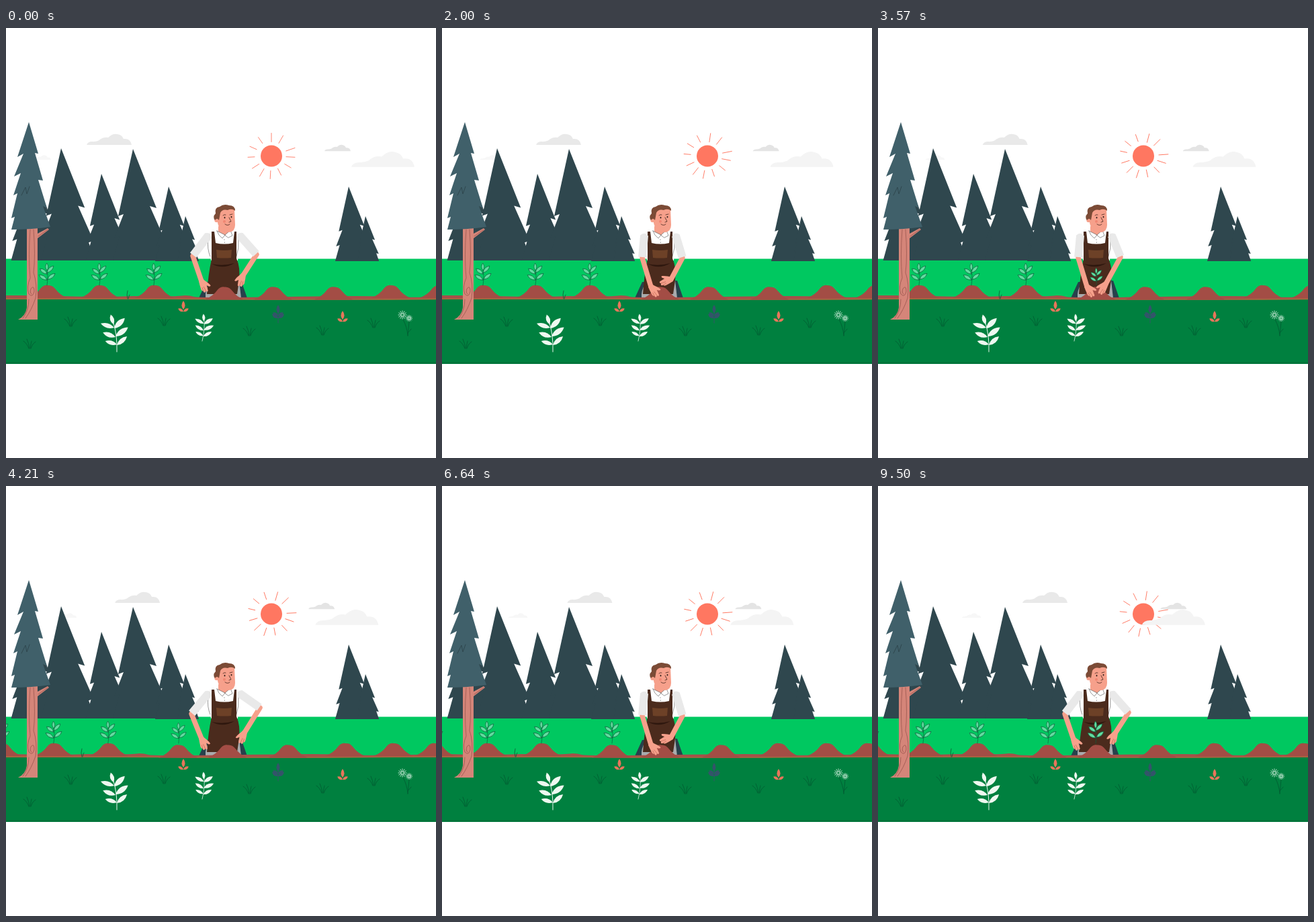
Animation, 640 px wide and 640 px high, one loop 9.57 s. Source, as an HTML page:

```html
<!DOCTYPE html>
<html lang="en">
<head>
<meta charset="utf-8">
<title>Planting</title>
<style>
html, body { margin: 0; width: 100%; height: 100%; overflow: hidden; background: #fff; }
svg { display: block; width: 100%; height: 100%; }
</style>
</head>
<body>
<svg id="stage" viewBox="0 0 640 640" fill="none" stroke-linecap="round" stroke-linejoin="round"></svg>
<script>
const LOOP = 9570, CYCLE = 4900, SLOT = 72;
const SKIN = '#f6a08b', NAVY = '#2f474e', SUN = '#ff7761';
const stage = document.getElementById('stage');
const $ = id => document.getElementById(id);
const rad = a => a * Math.PI / 180;

const place = (x, y, body, extra = '') =>
  `<g transform="translate(${x} ${y}) ${extra}">${body}</g>`;

const leaf = (x, y, angle, len, w) =>
  `<path transform="translate(${x} ${y}) rotate(${angle})" d="M0 0Q${len * .5} ${-w} ${len} 0Q${len * .5} ${w} 0 0Z"/>`;

const tree = (x, top, size) => {
  const s = size / 166;
  return `<path transform="translate(${x} ${top}) scale(${s})" d="M0 0L35 88 25 85 49 139 40 137 50 166H-30L-20 130-28 133-14 97-22 100Z"/>`;
};

const cloud = (id, y, width, fill) =>
  `<path id="${id}" data-y="${y}" data-s="${width / 100}" fill="${fill}" d="M0 25Q3 17 15 18Q27 17 30 13Q38 7 48 9Q59-2 70 2Q78 3 82 12Q97 10 100 25Z"/>`;

const tuft = (x, y) => place(x, y,
  '<path d="M-1 0Q-4-8-9-11M0 0Q-1-8-4-14M1 0Q2-7 3-11M2 0Q4-7 9-10"/>');

const mound = (x, y) =>
  `<path transform="translate(${x} ${y})" d="M-30 19Q-17 14-10 4Q-5-1 0 0Q7-1 12 6Q18 14 29 19Z"/>`;

const sprout = `<path d="M0 0Q2-14 0-25" fill="none"/>` +
  leaf(0, -8, -148, 14, 5) + leaf(1, -9, -38, 14, 5) +
  leaf(0, -17, -143, 13, 5) + leaf(0, -19, -45, 14, 5) + leaf(0, -22, -92, 11, 4);

const sapling = (x, id = '') =>
  `<g transform="translate(${x} 383)"><g${id && ` id="${id}"`} fill="#62dca0" stroke="#12603f" stroke-width=".7">${sprout}</g></g>`;

const fern = '<path d="M0 0Q1-26-6-46" fill="none" stroke="#eef8f0"/>' +
  leaf(-4, -36, 197, 21, 7) + leaf(-2, -22, 200, 20, 7) + leaf(0, -11, 196, 18, 6) +
  leaf(-4, -35, -44, 22, 8) + leaf(-2, -23, -36, 23, 8) + leaf(0, -10, -41, 20, 7) +
  leaf(-5, -41, -106, 15, 6);

const bud = leaf(0, -3, -90, 13, 5) + leaf(0, 0, -150, 9, 4) + leaf(0, 0, -30, 9, 4);

const puff = (x, y, r) => {
  let d = '';
  for (let i = 0; i < 12; i++) {
    const c = Math.cos(i * Math.PI / 6), s = Math.sin(i * Math.PI / 6);
    d += `M${x + c * r * .3} ${y + s * r * .3}L${x + c * r} ${y + s * r}`;
  }
  return `<path d="${d}" stroke="#d9f2e2" stroke-width=".9" stroke-dasharray="2 1"/>`;
};

// angle, inner radius, outer radius
const rays = [[-90, 21, 34], [-60, 22, 35], [-19, 23, 37], [3, 22, 35], [31, 23, 34], [63, 21, 32],
  [93, 22, 34], [120, 22, 35], [147, 22, 34], [177, 25, 35], [204, 24, 35], [235, 23, 34]];
const rayPath = rays.map(([a, r, q]) => {
  const c = Math.cos(rad(a)), s = Math.sin(rad(a));
  return `M${c * r} ${s * r}L${c * q} ${s * q}`;
}).join('');

const arm = side => `<path id="fore${side}" stroke="${SKIN}" stroke-width="7.5"/>
  <g id="hand${side}"><path fill="${SKIN}" d="M-2-3.5C3-5 6-8 12-9Q14-7 9-4L17-2Q19 0 16 1L17 3Q17 5 14 4.5Q13 7 9 6Q3 5-2 3.5Z"/>
  <path d="M9 1L16 1M9 3.5L14 4.5" stroke="#b9614f" stroke-width=".6"/></g>
  <path id="sleeve${side}" fill="#e9e9e9"/>`;

const clouds = cloud('cloudD', 189, 29, '#f7f7f7') + cloud('cloudA', 157, 67, '#e9e9e9') +
  cloud('cloudB', 183, 94, '#f4f4f4') + cloud('cloudC', 173.5, 39, '#e4e4e4');

const frontTree = `
  <path fill="#d58579" d="M31 295H47V306L62 298 64 300 47 313V434H18Q29 429 31 416Z"/>
  <path stroke="#925149" stroke-width=".7" d="M36 300Q33 340 36 372Q30 386 34 396Q40 402 42 392Q42 382 37 388Q35 394 38 396M41 300Q44 340 41 364Q47 382 44 402Q38 420 29 432M34 404Q34 420 25 432M48 310L62 300"/>
  <path fill="#40606a" d="M34 140L48 187 43 186 55 227 48 226 61 268 55 265 66 296Q38 300 8 300L13 281 8 283 17 246 11 249 22 216 12 221 26 187 17 192Z"/>
  <path stroke="${NAVY}" d="M23 249L29 237 31 247 35 236"/>`;

const body = `
  <path fill="#27414c" d="M298 378L287 402H359L350 376Z"/>
  <path fill="#a8abad" d="M303 380Q296 390 297 402H350L347 376Z"/>
  <path fill="#fff" d="M301 305L316 302H334L348 305 345 346H305Z"/>
  <path stroke="#555" stroke-width=".6" d="M301 315Q299 329 304 340M346 315Q347 328 343 340"/>
  <path fill="${SKIN}" d="M316 295V305Q324 313 332 306V299Z"/>
  <path fill="#fff" stroke="#555" stroke-width=".6" d="M314 302L326 308 322 313Q316 309 314 302ZM326 308L334 301 337 309 331 312Z"/>
  <path stroke="#444" stroke-width="1.2" d="M325 315V315M325.500 319V319"/>
  <path fill="#4b2b1d" d="M306 303L310 303 312 320Q325 323 338 320L340 303 343 303 343 343Q349 356 347 376L344 396H299Q301 366 306 344Z"/>
  <path fill="#6d4127" d="M313 330Q325 332 336 330L335 342Q325 343 314 342Z"/>
  <path fill="#2e170e" d="M306 351Q322 355 340 350Q323 360 306 351Z"/>
  <path fill="${SKIN}" d="M316 269Q329 263 340 270L341 293Q341 303 332 304Q318 304 315 290Z"/>
  <circle cx="313.500" cy="286" r="3.200" fill="${SKIN}"/>
  <path fill="#7b4b36" d="M311 286Q307 281 312 276Q310 267 318 266Q324 261 332 264Q341 264 341 272Q336 268 330 271Q322 269 319 275L317 286Q314 282 311 286Z"/>
  <path stroke="#43251d" stroke-width=".8" d="M323 279Q325 277 327 278M333 278L337 277M332 282L335 288 332 289M326 292Q330 295 333 292"/>
  <path stroke="#2b1c18" stroke-width="1.800" d="M325.500 282V282.500M335.500 281V281.500"/>
  <circle cx="325" cy="288" r="2" fill="#f08673"/>`;

const soil = `
  <path fill="#a6504a" d="M-40 399Q20 397 80 399T190 399Q260 400 266 398Q274 398 280 400T420 400T560 400T740 399V404H-40Z"/>
  <path stroke="#a8683f" stroke-width="1.600" d="M-40 403.500Q120 402 300 403.500T740 402.500"/>
  <g fill="#a34d45">${[62, 140, 221, 325, 398, 488, 573, 645, 706]
    .map((x, i) => mound(x, i > 2 && i < 6 ? 385.5 : 383)).join('')}</g>
  <g stroke="#14603a" stroke-width=".9"><path d="M181 403Q179 397 181 391M182 403Q183 398 184 397"/></g>
  ${[61, 139, 220].map(x => sapling(x)).join('')}${sapling(325, 'new0')}${sapling(396, 'new1')}`;

const plants = `
  <g stroke="#006234" stroke-width="1">${[[96, 444], [235, 443], [362, 458], [471, 457], [547, 446], [35, 477]]
    .map(p => tuft(...p)).join('')}</g>
  <g fill="#eef8f0">${place(165, 482, fern)}${place(292, 466, fern, 'rotate(12) scale(.72)')}</g>
  <g fill="#e8765b">${place(264, 422, bud)}${place(501, 437, bud)}</g>
  <g fill="#34546a">${place(405, 428, bud)}${place(405, 432, leaf(0, 0, -145, 11, 5) + leaf(0, 0, -35, 11, 5))}
  <path d="M405 424V439" stroke="#34546a"/></g>
  <path stroke="#006234" d="M591 434Q597 445 598 458M600 437Q599 448 598 458M598 454L603 448"/>
  ${puff(590, 427, 6)}${puff(600, 432, 4.5)}`;

stage.innerHTML = `
  <g id="rays"><path d="${rayPath}" stroke="${SUN}" stroke-width=".9"/></g>
  <circle cx="395" cy="190.500" r="16" fill="${SUN}"/>
  ${clouds}
  <path fill="#00c860" d="M0 343.500H640V405H0Z"/>
  <g fill="${NAVY}">${tree(34, 200, 146)}${tree(82, 179, 167)}${tree(142, 217, 129)}${tree(189, 180, 166)}
  ${tree(242, 236, 111)}${tree(267, 280, 67)}${tree(510, 236, 111)}${tree(535, 280, 67)}</g>
  <path fill="#00803f" d="M0 404H640V500H0Z"/>
  <path fill="#00753a" d="M0 497H640V500H0Z"/>
  ${body}
  <g id="soil">${soil}</g>
  ${arm('L')}${arm('R')}
  ${frontTree}${plants}`;

// left elbow x y, wrist x y, hand angle, then the same for the right
const poses = {
  hip:   [278, 339, 291, 377, 62, 373, 337, 353, 368, 112],
  wide:  [276, 339, 291, 376, 66, 378, 330, 355, 367, 115],
  dig:   [298, 342, 311, 385, 52, 358, 342, 341, 374, 162],
  press: [298, 342, 311, 384, 50, 359, 342, 340, 380, 150],
  cup:   [297, 341, 311, 383, 32, 354, 341, 335, 384, 148],
  plant: [298, 342, 311, 385, 55, 361, 341, 339, 381, 125]
};
const poseKeys = [[0, 'hip'], [620, 'hip'], [1050, 'dig'], [1350, 'press'], [1680, 'dig'], [2050, 'dig'],
  [2600, 'cup'], [2980, 'cup'], [3350, 'plant'], [3600, 'plant'], [4100, 'wide'], [4230, 'wide'],
  [4560, 'hip'], [5000, 'hip']];
const sunKeys = [[0, 0], [2000, 8], [3570, 15], [4600, 17], [5500, 16.5], [7860, 13], [9570, 8.8]];

const clamp = v => Math.min(1, Math.max(0, v));
const smooth = v => v * v * (3 - 2 * v);
const mix = (a, b, k) => a + (b - a) * k;

function segment(keys, t) {
  let i = 0;
  while (i < keys.length - 2 && t >= keys[i + 1][0]) i++;
  const [t0, a] = keys[i], [t1, b] = keys[i + 1];
  return [a, b, clamp((t - t0) / (t1 - t0))];
}

function drawArm(side, sx, sy, [ex, ey, wx, wy, angle]) {
  const dx = ex - sx, dy = ey - sy, len = Math.hypot(dx, dy);
  const nx = -dy / len, ny = dx / len;
  const cx = sx + dx * .97, cy = sy + dy * .97;
  const at = (x, y, w) => `${x + nx * w} ${y + ny * w}`;
  $('sleeve' + side).setAttribute('d',
    `M${at(sx, sy, 6)}L${at(cx, cy, 6)} ${at(cx, cy, -6)} ${at(sx, sy, -6)}Q${sx - dx * .2} ${sy - dy * .2} ${at(sx, sy, 6)}Z`);
  $('fore' + side).setAttribute('d', `M${mix(sx, ex, .85)} ${mix(sy, ey, .85)}L${ex} ${ey} ${wx} ${wy}`);
  $('hand' + side).setAttribute('transform',
    `translate(${wx} ${wy}) rotate(${angle}) scale(1 ${side === 'L' ? 1 : -1})`);
}

function moveCloud(id, x) {
  const el = $(id), s = el.dataset.s;
  el.setAttribute('transform', `translate(${x} ${el.dataset.y}) scale(${s} ${s * 1.01})`);
}

function grow(id, t) {
  const k = t < 3050 ? 0 : t < 3570 ? mix(.3, .78, (t - 3050) / 520) : mix(.78, 1, smooth(clamp((t - 3570) / 1030)));
  $(id).setAttribute('transform', `scale(${k})`);
}

function draw(t) {
  const s = t / 1000;
  moveCloud('cloudA', 120 + 10 * s);
  moveCloud('cloudB', 514 - 12.75 * s);
  moveCloud('cloudC', 474 - 5.65 * s);
  moveCloud('cloudD', 38 + 9.1 * s);

  const [a, b, k] = segment(sunKeys, t);
  $('rays').setAttribute('transform', `translate(395 190.5) rotate(${mix(a, b, k)})`);

  $('soil').setAttribute('transform', `translate(${-SLOT * smooth(clamp((t - 3640) / 665))} 0)`);
  grow('new0', t);
  grow('new1', t - CYCLE);

  const [from, to, p] = segment(poseKeys, t % CYCLE);
  const pose = poses[from].map((v, i) => mix(v, poses[to][i], smooth(p)));
  drawArm('L', 301, 309, pose.slice(0, 5));
  drawArm('R', 348, 309, pose.slice(5));
}

const start = performance.now();
function tick() {
  draw((performance.now() - start) % LOOP);
  requestAnimationFrame(tick);
}
tick();
</script>
</body>
</html>
```
